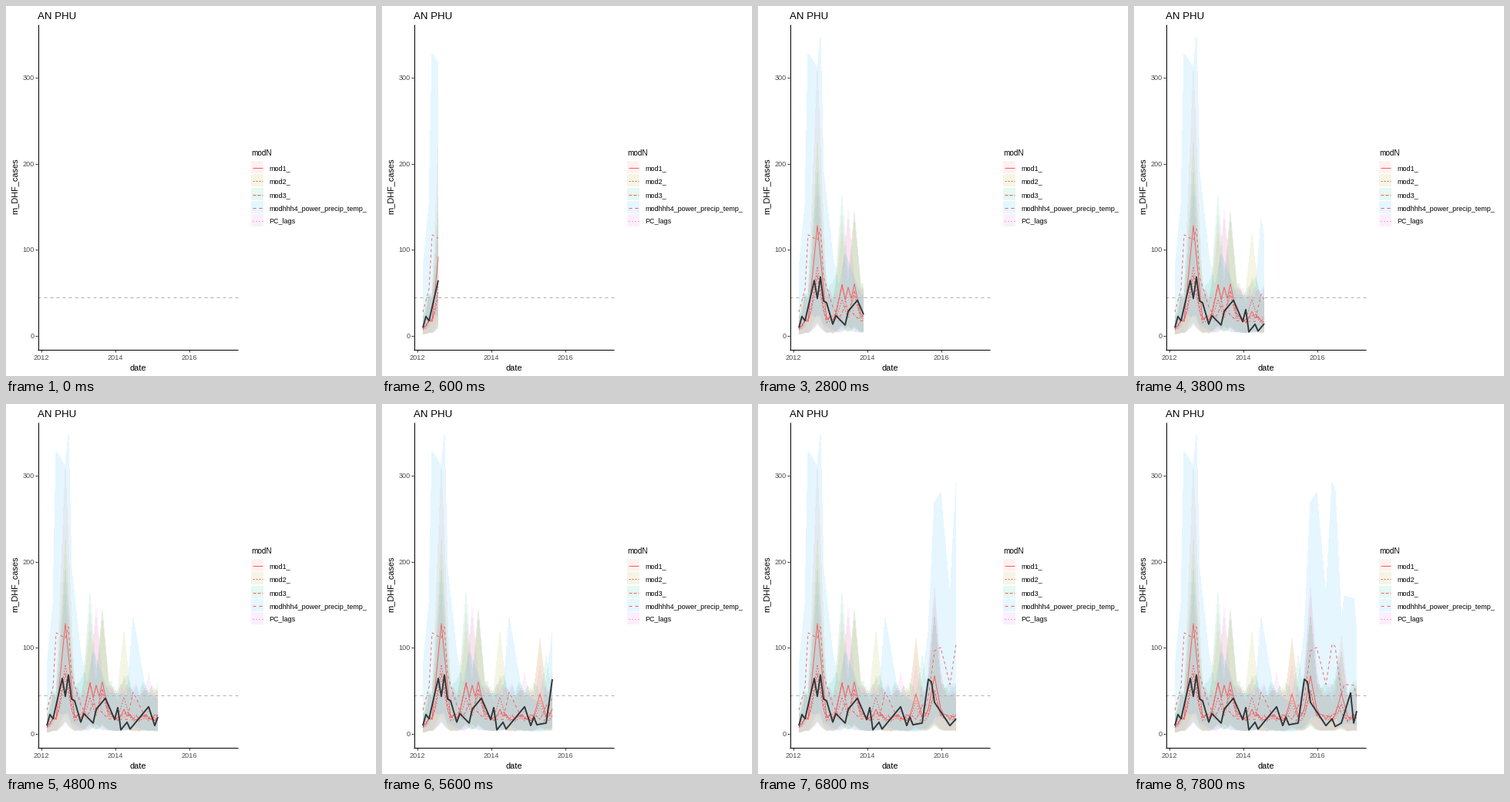
Recreate the animation shown at these times as a matplotlib script. Size 480 by 480 pixels, loop 8 s.

```python
import numpy as np
import matplotlib.pyplot as plt
from matplotlib.animation import FuncAnimation
from matplotlib.patches import Polygon, Rectangle

FRAMES, INTERVAL = 40, 200
DPI = 80
PX = 72 / DPI  # points per pixel
MONTHS = np.arange(60)
RED = "#f95a5a"

plt.rcParams["font.family"] = "Liberation Sans"
rng = np.random.default_rng(4)


def to_x(month):
    return 53 + 4 * np.asarray(month)


def to_y(value):
    return 427.3 - 1.115 * np.asarray(value)


def curve(*points):
    """Monthly series through a few (month, value) turning points."""
    return np.interp(MONTHS, *zip(*points))


def outbreaks(*peaks, width=3.5):
    """Low noisy level with a tent-shaped outbreak at each (month, height)."""
    level = 18 * np.minimum(1, (MONTHS + 2) / 5)
    level = level * rng.uniform(0.75, 1.25, MONTHS.size)
    tents = [height * (1 - abs(MONTHS - month) / width)
             for month, height in peaks]
    return np.maximum(level, np.max(tents, axis=0))


def text(x, y, label, size, color="black", **kw):
    kw.setdefault("va", "baseline")
    ax.text(x, y, label, size=size * PX, color=color, **kw)


def line(x, y, color, width=1, dash=None, **kw):
    style = (0, dash) if dash else "-"
    return ax.plot(x, y, color=color, lw=width * PX, ls=style,
                   solid_capstyle="butt", dash_capstyle="butt", **kw)[0]


fig = plt.figure(figsize=(6, 6), dpi=DPI, facecolor="white")
ax = fig.add_axes([0, 0, 1, 1])
ax.set(xlim=(0, 480), ylim=(480, 0))
ax.axis("off")

cases = curve(
    (0, 9), (1, 22), (2, 17), (5, 64), (6, 43), (7, 68), (8, 40), (9, 38),
    (11, 13), (12, 23), (15, 12), (16, 28), (19, 41), (22, 16), (23, 30),
    (24, 4), (26, 13), (27, 5), (33, 31), (35, 9), (36, 19), (37, 10),
    (40, 12), (42, 63), (43, 60), (44, 36), (49, 9), (51, 17), (52, 8),
    (54, 12), (57, 47), (58, 12), (59, 26))

power = curve(
    (0, 27), (2, 54), (3, 117), (6, 111), (7, 124), (8, 68), (11, 33),
    (13, 20), (15, 34), (20, 17), (26, 16), (28, 48), (32, 18), (39, 11),
    (42, 42), (44, 96), (46, 100), (49, 57), (51, 104), (52, 101), (54, 46),
    (55, 57), (58, 56), (59, 42))

# name, colour, dash pattern, mean, upper bound relative to the mean
MODELS = [
    ("mod1_", "#F8766D", None,
     outbreaks((6, 128), (14, 58), (16, 56), (18, 60), (25, 28), (38, 46),
               (44, 67), (54, 47)), 2.4),
    ("mod2_", "#A3A500", (2, 2),
     outbreaks((6, 80), (14, 42), (18, 47), (25, 42), (38, 38), (44, 48),
               (54, 34)), 2.8),
    ("mod3_", "#00BF7D", (4, 2),
     outbreaks((6, 70), (14, 60), (18, 52), (26, 25), (40, 33), (44, 50),
               (53, 33)), 2.7),
    ("modhhh4_power_precip_temp_", "#00B0F6", (4, 4), power, 2.8),
    ("PC_lags", "#E76BF3", (1, 3),
     outbreaks((6, 62), (16, 56), (33, 27), (38, 30), (44, 65),
               (54, 36)), 2.6),
]

# Axes, ticks and titles
line([41.5, 41.5], [24, 446], "black", zorder=5)
line([41, 301], [445.5, 445.5], "black", zorder=5)
for value in (0, 100, 200, 300):
    y = np.floor(to_y(value)) + 0.5
    line([38, 41], [y, y], "#333333")
    text(36.5, y + 3.6, str(value), 9.2, "#4D4D4D", ha="right")
for x, year in ((45.5, 2012), (141.5, 2014), (237.5, 2016)):
    line([x, x], [446, 449], "#333333")
    text(x, 459, str(year), 9.2, "#4D4D4D", ha="center")
text(41, 17, "AN PHU", 13.2, ha="left")
text(171, 473, "date", 11, ha="center")
text(16, 234, "m_DHF_cases", 11, ha="right", va="center", rotation=90)

# Threshold
line([41, 301], [377.5, 377.5], "#b0b0b0", dash=(4, 4), zorder=2.5)

# Legend
text(318, 194, "modN", 10, ha="left")
for k, (name, color, dash, _, _) in enumerate(MODELS):
    top = 201 + round(17.28 * k)
    ax.add_patch(Rectangle((318, top), 16, 16, fc=color, alpha=0.1, lw=0))
    line([320, 333], [top + 8.5, top + 8.5], RED, dash=dash)
    text(341, top + 12.5, name, 9.05, ha="left")

# Data layers
xs = to_x(MONTHS)
ribbons, means = [], []
for name, color, dash, mean, ratio in MODELS:
    band = Polygon(np.zeros((3, 2)), fc=color, alpha=0.1, lw=0,
                   antialiased=False, zorder=2)
    ribbons.append((ax.add_patch(band), to_y(ratio * mean), to_y(0.2 * mean)))
    means.append((line([], [], RED, 0.9, dash, zorder=3), to_y(mean)))
observed = line([], [], "#2f3638", 1.9, zorder=4)


def update(frame):
    last = round(frame * 59 / (FRAMES - 1))
    n = last + 1 if last else 0
    for band, upper, lower in ribbons:
        band.set_visible(n > 0)
        if n:
            band.set_xy(np.column_stack([
                np.r_[xs[:n], xs[:n][::-1]],
                np.r_[upper[:n], lower[:n][::-1]]]))
    for path, ys in means:
        path.set_data(xs[:n], ys[:n])
    observed.set_data(xs[:n], to_y(cases[:n]))
    return []


anim = FuncAnimation(fig, update, frames=FRAMES, interval=INTERVAL,
                     init_func=lambda: update(0), repeat=True,
                     repeat_delay=0, blit=False)
plt.show()
```
